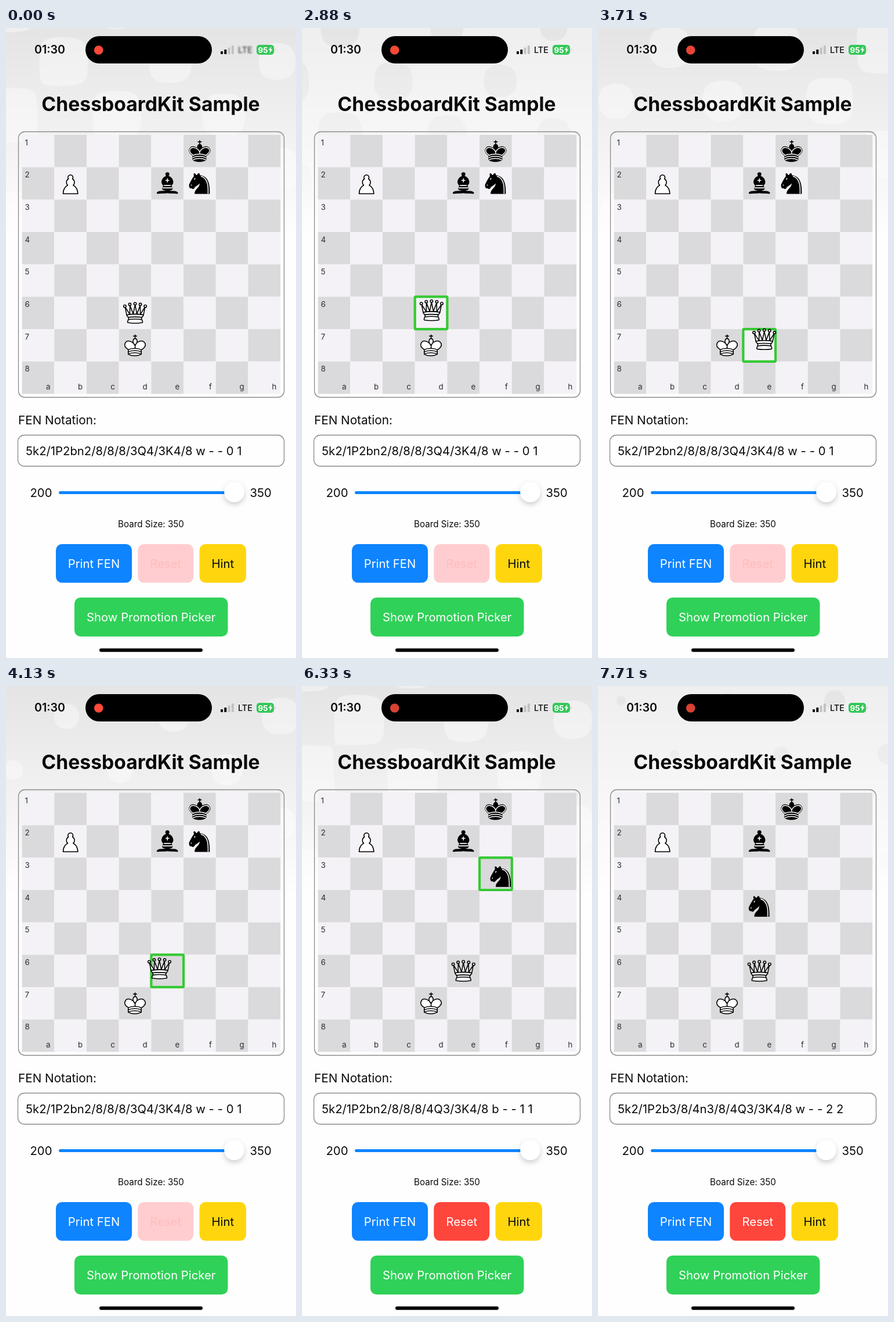
Recreate the animation shown at these times as an HTML page with a canvas. Size 500 by 1084 pixels, loop 8000 ms.

```html
<!DOCTYPE html>
<html lang="en">
<head>
<meta charset="utf-8">
<title>Chessboard sample</title>
<style>
  html, body { margin: 0; width: 100%; height: 100%; overflow: hidden; background: #fefefe; }
  canvas, svg { position: absolute; left: 0; top: 0; display: block; }
  text { font-family: Inter, "Open Sans", sans-serif; font-size: 20.3px; fill: #0a0a0c; }
  .mid { text-anchor: middle; }
  .coord { font-size: 13.4px; fill: #2c2c2e; }
  .frame { fill: none; stroke: #8a8a8c; stroke-width: 1.3; }
  .ink { stroke: #000; stroke-width: 1.5; stroke-linecap: round; stroke-linejoin: round; }
  .white { fill: #fff; }
  .black { fill: #000; }
  .line { fill: none; stroke: #fff; }
</style>
</head>
<body>
<canvas id="backdrop" width="500" height="360"></canvas>
<svg width="500" height="1084" viewBox="0 0 500 1084">
  <defs>
    <filter id="shadow" x="-50%" y="-50%" width="200%" height="200%">
      <feDropShadow dx="0" dy="4" stdDeviation="5" flood-opacity=".2"/>
    </filter>
    <g id="pawn" class="ink white">
      <path d="M22.5 9a4 4 0 0 0-3.2 6.4a6.5 6.5 0 0 0-1.2 10.4c-3 1-7.4 5.5-7.4 13.7h23.6c0-8.2-4.4-12.7-7.4-13.7a6.5 6.5 0 0 0-1.2-10.4a4 4 0 0 0-3.2-6.4z"/>
    </g>
    <g id="crown">
      <path fill="none" d="M22.5 11.6V6M20 8h5"/>
      <path d="M22.5 25s4.5-7.5 3-10.5c0 0-1-2.5-3-2.5s-3 2.5-3 2.5c-1.5 3 3 10.5 3 10.5"/>
      <path d="M11.5 37c5.5 3.5 15.5 3.5 21 0v-7s9-4.5 6-10.5c-4-6.5-13.5-3.5-16 4V27v-3.5c-3.5-7.5-13-10.5-16-4-3 6 5 10 5 10z"/>
    </g>
    <path id="bands" fill="none" d="M11.5 30c5.5-3 15.5-3 21 0m-21 3.5c5.5-3 15.5-3 21 0m-21 3.5c5.5-3 15.5-3 21 0"/>
    <g id="whiteKing" class="ink white"><use href="#crown"/><use href="#bands"/></g>
    <g id="blackKing" class="ink black">
      <use href="#crown"/>
      <g class="line" stroke-width="1.3">
        <use href="#bands"/>
        <path d="M32 29.5s8.5-4 6-9.7C34 14 25 18 22.5 24.6v2-2C20 18 10 14 7 20c-2.5 5.5 4.8 9 4.8 9"/>
      </g>
    </g>
    <g id="queen" class="ink white">
      <path d="M9 26c8.5-1.5 21-1.5 27 0l2.5-12.5L31 25l-.3-14-5.2 13.5-3-14.5-3 14.5L14.300 11 14 25 6.500 13.500z"/>
      <path d="M9 26c0 2 1.500 2 2.500 4 1 1.500 1 1 .5 3.500-1.500 1-1 2.500-1 2.500-1.500 1.500 0 2.500 0 2.500 6.500 1 16.500 1 23 0 0 0 1.500-1 0-2.500 0 0 .5-1.500-1-2.500-.5-2.500-.5-2 .5-3.500 1-2 2.500-2 2.500-4-8.500-1.500-18.500-1.500-27 0z"/>
      <path fill="none" d="M11.500 30c3.500-1 18.500-1 22 0M12 33.500c6-1 15-1 21 0"/>
      <circle cx="6" cy="12" r="2"/><circle cx="14" cy="9" r="2"/><circle cx="22.500" cy="8" r="2"/>
      <circle cx="31" cy="9" r="2"/><circle cx="39" cy="12" r="2"/>
    </g>
    <g id="bishop" class="ink black">
      <path d="M9 36c3.400-1 10 .4 13.500-2 3.400 2.400 10 1 13.500 2 0 0 1.700.5 3 2-.7 1-1.600 1-3 .5-3.400-1-10 .5-13.500-1-3.400 1.500-10 0-13.500 1-1.400.5-2.300.5-3-.5 1.300-1.500 3-2 3-2z"/>
      <path d="M15 32c2.500 2.500 12.500 2.500 15 0 .5-1.500 0-2 0-2 0-2.500-2.500-4-2.500-4 5.500-1.500 6-11.500-5-15.500-11 4-10.500 14-5 15.500 0 0-2.500 1.500-2.500 4 0 0-.5.5 0 2z"/>
      <circle cx="22.500" cy="8" r="2.500"/>
      <path class="line" d="M17.500 26h10M15 30h15m-7.500-14.500v5M20 18h5"/>
    </g>
    <g id="knight" class="ink black">
      <path d="M22 10c10.500 1 16.500 8 16 29H15c0-9 10-6.500 8-21"/>
      <path d="M24 18c.4 3-5.600 7.400-8 9-3 2-2.800 4.300-5 4-1-.9 1.400-3 0-3-1 0 .2 1.200-1 2-1 0-4 1-4-4 0-2 6-12 6-12s1.900-1.900 2-3.500c-.7-1-.5-2-.5-3 1-1 3 2.500 3 2.500h2s.8-2 2.500-3c1 0 1 3 1 3"/>
      <g fill="#fff" stroke="none">
        <circle cx="9" cy="25.500" r=".9"/>
        <ellipse cx="14.500" cy="15.500" rx=".8" ry="1.600" transform="rotate(30 14.500 15.500)"/>
        <path d="M24.600 10.400l-.5 1.500c3.500 1 6.200 2.600 8.400 6.800 2.300 4.300 3.200 10.300 2.800 20.800h1.400c.5-10.600-.6-17.400-3-21.700-2.400-4.400-5.800-6.800-9.100-7.400z"/>
      </g>
    </g>
  </defs>

  <!-- status bar -->
  <text x="49" y="44.300" style="font-size:19.700px;font-weight:600">01:30</text>
  <rect x="137" y="14" width="218" height="47" rx="23.500"/>
  <circle id="dot" cx="159.700" cy="38" r="7.800"/>
  <g id="signal">
    <rect x="370" y="40" width="4" height="5" rx="1"/>
    <rect x="376.300" y="37" width="4" height="8" rx="1"/>
    <rect x="382.600" y="33.500" width="4" height="11.500" rx="1" fill="#c2c1c5"/>
    <rect x="388.900" y="30" width="4" height="15" rx="1" fill="#c2c1c5"/>
  </g>
  <text id="network" x="400" y="43.300" style="font-size:14.400px;font-weight:500">LTE</text>
  <rect x="432" y="29" width="30" height="17" rx="5" fill="#34c759"/>
  <path d="M463.500 35q2 2.500 0 5z" fill="#a6a6aa"/>
  <text x="434.500" y="42.500" style="font-size:13.500px;font-weight:700;fill:#fff">95</text>
  <path d="M457.500 31.500l-5 6.500h3l-1.200 5.500 5.200-7h-3z" fill="#fff"/>

  <text class="mid" x="249.500" y="143" style="font-size:33.700px;font-weight:700">ChessboardKit Sample</text>

  <!-- board -->
  <rect class="frame" x="21.500" y="178.500" width="458" height="457" rx="11"/>
  <g id="board"></g>
  <rect id="target" width="55.700" height="55.700" rx="1.500" fill="none" stroke="#35c934" stroke-width="4.200"/>
  <g id="pieces"></g>

  <!-- controls -->
  <text x="21" y="682" style="font-size:20.700px">FEN Notation:</text>
  <rect class="frame" x="20.500" y="700.500" width="459" height="53.500" rx="11"/>
  <text id="fen" x="34" y="735"></text>
  <text x="41.500" y="807">200</text>
  <text x="420.500" y="807">350</text>
  <rect x="91" y="797" width="300" height="5" rx="2.500" fill="#0e84ff"/>
  <circle cx="393.500" cy="798.500" r="17.300" fill="#fff" filter="url(#shadow)"/>
  <text class="mid" x="250" y="859" style="font-size:15.200px">Board Size: 350</text>
  <g id="buttons"></g>
  <rect x="161" y="1067.500" width="178" height="6" rx="3"/>
</svg>

<script>
const LOOP = 8000;
const CELL = 55.7, LEFT = 27.6, TOP = 183.9;
const PIECE_SCALE = 1.07;
const $ = id => document.getElementById(id);
const NS = 'http://www.w3.org/2000/svg';

function add(parent, tag, attrs, text = '') {
  const node = document.createElementNS(NS, tag);
  for (const key in attrs) node.setAttribute(key, attrs[key]);
  node.textContent = text;
  parent.append(node);
  return node;
}

const center = (col, row) => [LEFT + (col + .5) * CELL, TOP + (row + .5) * CELL];

// --- static parts ---
const board = $('board');
for (let row = 0; row < 8; row++) {
  for (let col = 0; col < 8; col++) {
    add(board, 'rect', {
      x: LEFT + col * CELL, y: TOP + row * CELL, width: CELL, height: CELL,
      fill: (row + col) % 2 ? '#dad9db' : '#f4f2f6'
    });
  }
}
for (let i = 0; i < 8; i++) {
  add(board, 'text', { class: 'coord', x: 32.5, y: 201.5 + i * CELL }, i + 1);
  add(board, 'text', { class: 'coord', x: 76.5 + i * CELL, y: 622, 'text-anchor': 'end' }, 'abcdefgh'[i]);
}

function button(x, y, width, height, fill, label, color) {
  const box = add($('buttons'), 'rect', { x, y, width, height, rx: 10.5, fill });
  const text = add($('buttons'), 'text', { class: 'mid', x: x + width / 2, y: y + 41 }, label);
  text.style.fill = color;
  return { box, text };
}
button(86, 888, 131, 66.5, '#0e84ff', 'Print FEN', '#fff');
const reset = button(227.3, 888, 96, 66.5, '#ffcdcf', 'Reset', '#fff');
button(333.5, 888, 80.5, 66.5, '#ffd60d', 'Hint', '#0a0a0c');
button(118, 980, 264.5, 67, '#30d158', 'Show Promotion Picker', '#fff');

function place(piece, [x, y]) {
  piece.setAttribute('transform',
    `translate(${x} ${y}) scale(${PIECE_SCALE}) translate(-22.5 -22.8)`);
}
function piece(name, col, row) {
  const node = add($('pieces'), 'use', { href: '#' + name });
  place(node, center(col, row));
  return node;
}
piece('blackKing', 5, 0);
piece('pawn', 1, 1);
piece('bishop', 4, 1);
piece('whiteKing', 3, 6);

// --- drags: [time, x, y] ---
const drags = [
  { node: piece('knight', 5, 1), from: center(5, 1), to: center(4, 3), path: [
    [5700, 333.900, 267.500], [5950, 338, 285], [6180, 357, 318], [6330, 343, 327.500],
    [6480, 318, 362], [6700, 288, 377], [6980, 280, 380]] },
  { node: piece('queen', 3, 5), from: center(3, 5), to: center(4, 5), path: [
    [2820, 222.500, 490.200], [3000, 225, 477], [3290, 256, 447], [3450, 350, 462],
    [3600, 315, 540], [3800, 264, 532], [4130, 264.500, 486], [4420, 273, 489]] }
];

function along(path, t) {
  const i = path.findIndex(step => step[0] > t);
  const [t0, x0, y0] = path[i - 1], [t1, x1, y1] = path[i];
  const p = (t - t0) / (t1 - t0);
  return [x0 + (x1 - x0) * p, y0 + (y1 - y0) * p];
}

function moveDrags(t) {
  let held = null;
  for (const { node, from, to, path } of drags) {
    const start = path[0][0], end = path[path.length - 1][0];
    const active = t >= start && t < end;
    const spot = active ? along(path, t) : t < start ? from : to;
    if (active) held = spot;
    place(node, spot);
  }
  const target = $('target');
  target.style.display = held ? '' : 'none';
  if (held) {
    target.setAttribute('x', LEFT + Math.floor((held[0] - LEFT) / CELL) * CELL);
    target.setAttribute('y', TOP + Math.floor((held[1] - TOP) / CELL) * CELL);
  }
}

const positions = [
  [6980, '5k2/1P2b3/8/4n3/8/4Q3/3K4/8 w - - 2 2'],
  [4420, '5k2/1P2bn2/8/8/8/4Q3/3K4/8 b - - 1 1'],
  [0, '5k2/1P2bn2/8/8/8/3Q4/3K4/8 w - - 0 1']
];

// --- drifting checker waves behind the title ---
const ctx = $('backdrop').getContext('2d');
const { width: W, height: H } = ctx.canvas;
const image = ctx.createImageData(W, H);
const PITCH = 92, K = Math.PI / PITCH, DRIFT = 43.7;

function paintBackdrop(s) {
  const cosX = Array.from({ length: W }, (_, x) => Math.cos(K * (x - 100 + DRIFT * s)));
  const cosY = Array.from({ length: H }, (_, y) => Math.cos(K * (y - 56 - DRIFT * s)));
  const level = Array.from({ length: W + H }, (_, d) => Math.sin(s - .11 - .00093 * (d - H)));
  for (let y = 0, i = 3; y < H; y++) {
    const fade = 255 * (1 - y / H);
    for (let x = 0; x < W; x++, i += 4) {
      const edge = (cosX[x] * cosY[y] + level[x - y + H]) / .03 + .5;
      const light = Math.min(1, Math.max(0, edge));
      image.data[i] = fade * (.1 - .04 * light);
    }
  }
  ctx.putImageData(image, 0, 0);
}

function draw(t) {
  paintBackdrop(t / 1000);
  moveDrags(t);
  $('fen').textContent = positions.find(([start]) => t >= start)[1];

  const enabled = t >= 4420;
  reset.box.setAttribute('fill', enabled ? '#ff463c' : '#ffcdcf');
  reset.text.style.fill = enabled ? '#fff' : '#ffbcbe';

  const glow = .5 + .5 * Math.cos((t - 4100) / 1400 * 2 * Math.PI);
  $('dot').setAttribute('fill', `rgb(${214 + 41 * glow},${65 + 10 * glow},${49 + 7 * glow})`);

  const blur = Math.max(0, 1 - t / 600);
  $('network').style.filter = blur ? `blur(${1.6 * blur}px)` : 'none';
  $('network').style.opacity = 1 - .25 * blur;
}

function tick() {
  draw(performance.now() % LOOP);
  requestAnimationFrame(tick);
}
tick();
</script>
</body>
</html>
```
